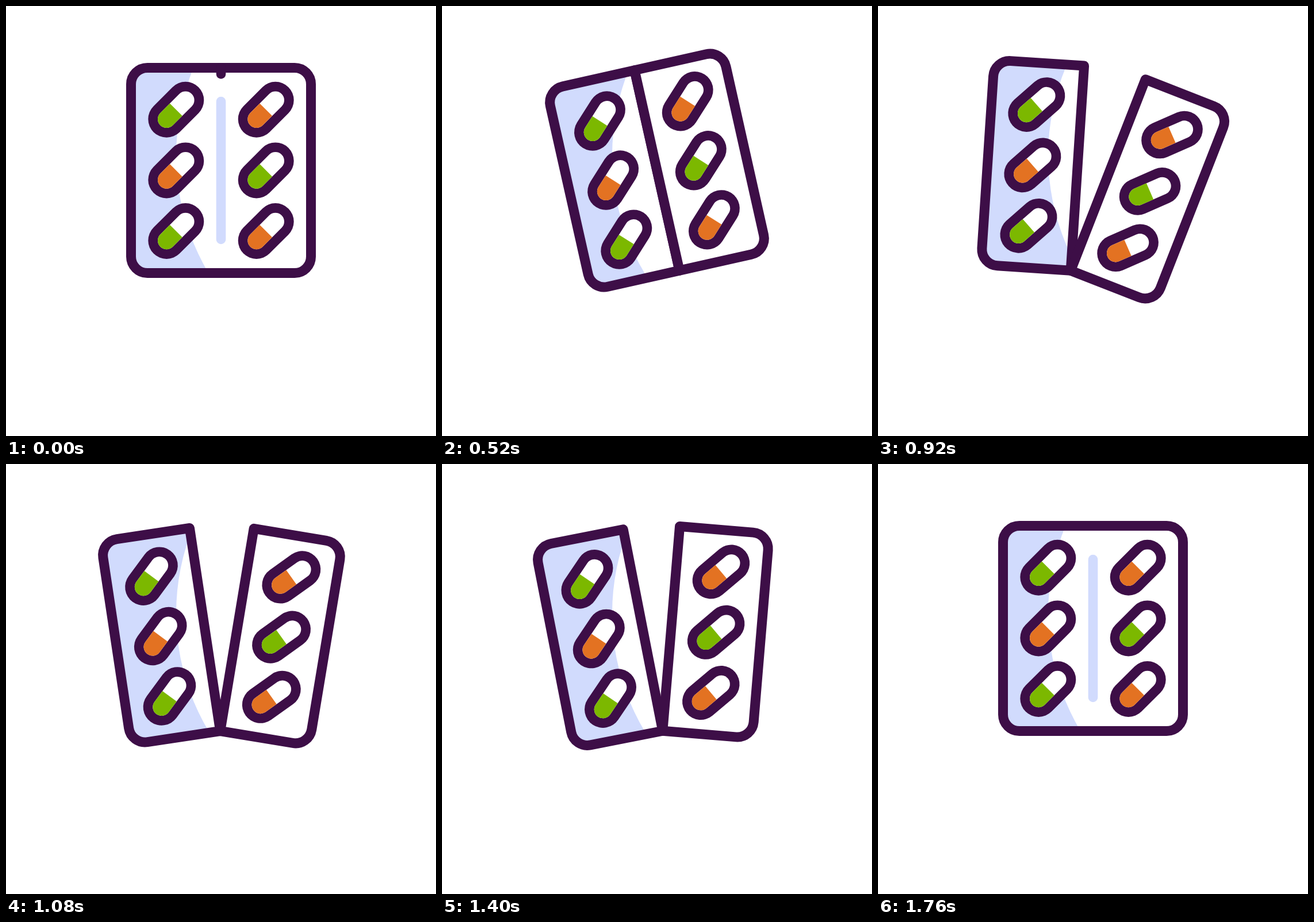
Recreate the animation shown at these times as an HTML page with a canvas. Size 748x748 px, loop 2000 ms.

```html
<!DOCTYPE html>
<html lang="en">
<head>
<meta charset="utf-8">
<title>Pill pack</title>
<style>
html, body { margin: 0; width: 100%; height: 100%; overflow: hidden; background: #fff; }
canvas { display: block; }
</style>
</head>
<body>
<canvas id="stage" width="748" height="748"></canvas>
<script>
const ctx = document.getElementById('stage').getContext('2d');
const DARK = '#3d0e47', PALE = '#d1dbfd', GREEN = '#7cb800', ORANGE = '#e37222';
const LOOP = 2000, STEP = 40, REST = 1760, SPLIT = 510;
const MID = 374, CENTER = 286, LEFT = 217.5, TOP = 107.5, WIDTH = 313, HEIGHT = 357;
const BOTTOM = TOP + HEIGHT, RADIUS = 28.5;

// Pairs of time in ms and angle in degrees
const swing = [[0, 0], [510, -12.7], [900, 12.8], [1200, -6.3], [1600, 0]];

function ease(t, start, end) {
  const x = Math.min(1, Math.max(0, (t - start) / (end - start)));
  return x * x * (3 - 2 * x);
}

function swingAngle(t) {
  return swing.slice(1).reduce((angle, [end, value], i) =>
    angle + (value - swing[i][1]) * ease(t, swing[i][0], end), 0);
}

function openAngle(t) {
  return t < 1200 ? 9 * ease(t, SPLIT, 960) : 9 * (1 - ((t - 1200) / 580) ** 2);
}

function rotate(degrees, x, y) {
  ctx.translate(x, y);
  ctx.rotate(degrees * Math.PI / 180);
  ctx.translate(-x, -y);
}

function line(x, y1, y2, color) {
  ctx.beginPath();
  ctx.moveTo(x, y1);
  ctx.lineTo(x, y2);
  ctx.strokeStyle = color;
  ctx.lineWidth = 16.6;
  ctx.stroke();
}

// The shade keeps its place on the stage and is only masked by the pack
function panel(x, width, corners) {
  const path = new Path2D();
  path.roundRect(x, TOP, width, HEIGHT, corners);
  ctx.save();
  ctx.clip(path);
  ctx.resetTransform();
  ctx.fillStyle = x < MID ? PALE : '#fff';
  ctx.fillRect(0, 0, 748, 748);
  ctx.fillStyle = '#fff';
  ctx.beginPath();
  ctx.arc(696, 260, 400, 0, 7);
  ctx.fill();
  ctx.restore();
  ctx.strokeStyle = DARK;
  ctx.lineWidth = 17;
  ctx.stroke(path);
}

function pill(x, y, color) {
  const half = 23.3, r = 15.3;
  ctx.save();
  ctx.translate(x, y);
  ctx.rotate(-Math.PI / 4);
  for (const [width, fill] of [[64, DARK], [2 * r, '#fff']]) {
    ctx.beginPath();
    ctx.moveTo(-half, 0);
    ctx.lineTo(half, 0);
    ctx.lineWidth = width;
    ctx.strokeStyle = fill;
    ctx.stroke();
  }
  ctx.beginPath();
  ctx.arc(-half, 0, r, Math.PI / 2, Math.PI * 1.5);
  ctx.lineTo(0, -r);
  ctx.lineTo(0, r);
  ctx.fillStyle = color;
  ctx.fill();
  ctx.restore();
}

function pills(side) {
  for (let i = 0; i < 3; i++) {
    const green = (i % 2 === 0) === (side < 0);
    pill(MID + side * 78.2, 180.3 + i * 105.6, green ? GREEN : ORANGE);
  }
}

function half(side, angle) {
  ctx.save();
  rotate(side * angle, MID, BOTTOM);
  if (side < 0) panel(LEFT, WIDTH / 2, [RADIUS, 0, 0, RADIUS]);
  else panel(MID, WIDTH / 2, [0, RADIUS, RADIUS, 0]);
  pills(side);
  ctx.restore();
}

function draw(t) {
  const resting = t >= REST;
  ctx.resetTransform();
  ctx.fillStyle = '#fff';
  ctx.fillRect(0, 0, 748, 748);
  ctx.lineCap = ctx.lineJoin = 'round';
  if (!resting) rotate(swingAngle(t), MID, CENTER);
  if (resting || t < SPLIT) {
    panel(LEFT, WIDTH, RADIUS);
    line(MID, 166, 406, PALE);
    if (!resting) line(MID, TOP, TOP + HEIGHT * ease(t, -46, 394), DARK);
    pills(-1);
    pills(1);
  } else {
    half(-1, openAngle(t));
    half(1, openAngle(t));
  }
}

const start = performance.now();
function tick() {
  const t = (performance.now() - start) % LOOP;
  draw(Math.floor(t / STEP) * STEP);
  requestAnimationFrame(tick);
}
tick();
</script>
</body>
</html>
```
